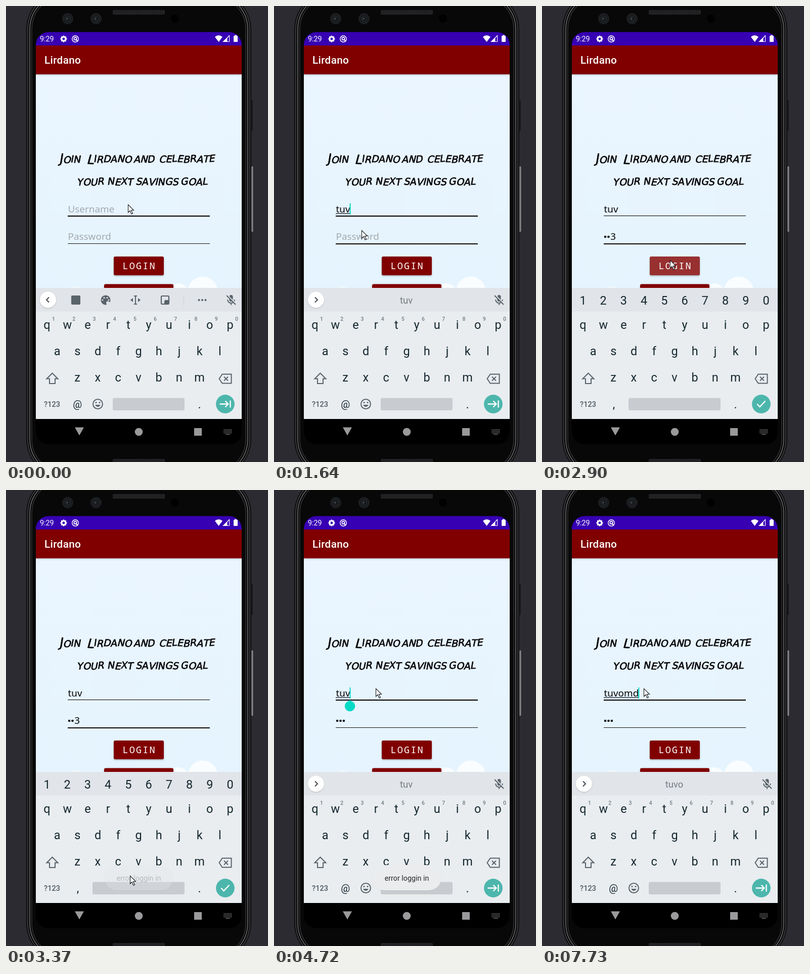
Animation, 518 px wide and 901 px high, one loop 8000 ms. Source, as an HTML page with a canvas:

```html
<!DOCTYPE html>
<html lang="en">
<head>
<meta charset="utf-8">
<title>Login screen</title>
<style>
html, body { margin: 0; width: 100%; height: 100%; overflow: hidden; background: #2c2b31; }
canvas { display: block; width: 518px; height: 901px; }
</style>
</head>
<body>
<canvas id="stage" width="518" height="901"></canvas>
<script>
const ctx = document.getElementById('stage').getContext('2d');
const LOOP = 8000;
const ROBOTO = 'Roboto, sans-serif';
const FIELD = '18.9px "Noto Sans", sans-serif';
const MAROON = '#800000', INK = '#14272e', ICON = '#59636a', TEAL = '#4db6ac', ACCENT = '#03dac5';
const PITCH = 40.22;

// Username over time: [start, text]
const typed = [
  [0, ''], [340, 't'], [520, 'tu'], [700, 'tuv'], [5510, 'tuvo'], [5910, 'tuv'], [6100, 'tuvo'],
  [6470, 'tuvo '], [6710, 'tuvo. '], [6960, 'tuvo.'], [7110, 'tuvo'], [7300, 'tuvom'], [7730, 'tuvomd']
];
const secret = [[0, ''], [1900, '1'], [2130, '•2'], [2380, '••3'], [3880, '•••']];
// Pointer keys: [time, x, y]
const pointer = [
  [1040, 241, 392], [1140, 226, 377], [1240, 201, 384], [1400, 173, 443],
  [2410, 173, 443], [2720, 253, 502], [3000, 253, 502], [3200, 249, 752],
  [3300, 245, 762], [3990, 245, 762], [4060, 218, 621], [4240, 207, 460], [4390, 201, 392]
];

const latest = (list, t) => list.filter(e => e[0] <= t).pop()[1];
const within = (t, a, b) => t >= a && t < b;
const ramp = (t, a, b) => Math.min(1, Math.max(0, (t - a) / (b - a)));

function pointerAt(t) {
  const next = pointer.findIndex(p => p[0] > t);
  if (next === 0) return pointer[0].slice(1);
  if (next < 0) return pointer[pointer.length - 1].slice(1);
  const a = pointer[next - 1], b = pointer[next], k = ramp(t, a[0], b[0]);
  return [a[1] + (b[1] - a[1]) * k, a[2] + (b[2] - a[2]) * k];
}

function rect(x, y, w, h, color) { ctx.fillStyle = color; ctx.fillRect(x, y, w, h); }
function round(x, y, w, h, r, fill, stroke, width = 1) {
  ctx.beginPath();
  ctx.roundRect(x, y, w, h, r);
  if (fill) { ctx.fillStyle = fill; ctx.fill(); }
  if (stroke) { ctx.strokeStyle = stroke; ctx.lineWidth = width; ctx.stroke(); }
}
function disc(x, y, r, color) {
  ctx.beginPath();
  ctx.arc(x, y, r, 0, 7);
  ctx.fillStyle = color;
  ctx.fill();
}
function ring(x, y, r, color, width) {
  ctx.beginPath();
  ctx.arc(x, y, r, 0, 7);
  ctx.strokeStyle = color; ctx.lineWidth = width;
  ctx.stroke();
}
function text(str, x, y, font, color, align = 'left', spacing = 0) {
  ctx.font = font; ctx.fillStyle = color; ctx.textAlign = align;
  ctx.letterSpacing = spacing + 'px';
  ctx.fillText(str, x, y);
  ctx.letterSpacing = '0px';
}
// SVG path drawn from a local origin
function path(d, x, y, fill, stroke, width = 2) {
  ctx.save();
  ctx.translate(x, y);
  const p = new Path2D(d);
  if (fill) { ctx.fillStyle = fill; ctx.fill(p); }
  if (stroke) { ctx.strokeStyle = stroke; ctx.lineWidth = width; ctx.stroke(p); }
  ctx.restore();
}
function shadow(color, blur, dy) { ctx.shadowColor = color; ctx.shadowBlur = blur; ctx.shadowOffsetY = dy; }
function noShadow() { shadow('transparent', 0, 0); }

function drawPhone() {
  rect(0, 0, 518, 901, '#2c2b31');
  round(484, 186, 4, 61, 1, '#19191c');
  round(484, 317, 4.5, 129, 1, '#858588');
  round(40.5, -30, 444, 962, 76, '#050506', '#161617', 1.5);
  round(43, -28, 439, 958, 74, null, '#4c4c4f', 1.5);
  round(47, -24, 431, 950, 70, '#0a0a0b', '#6a6a6d', 1.6);
  round(51, -20, 423, 942, 66, '#080808', '#333336', 1.5);
  for (const y of [8, 895]) {
    round(211, y, 103, 9, 2, '#242426');
    for (let x = 213; x < 312; x += 4) rect(x, y + 1, 1, 7, '#19191b');
  }
  for (const x of [122, 178]) {
    disc(x, 25, 11, '#1d1e21');
    disc(x, 25, 7, '#111315');
    ring(x, 25, 5, '#2b3033', 1.4);
    disc(x - 1, 25, 2, '#42474a');
  }
  disc(334, 25, 8, '#010102');
}

function drawStatusBar() {
  rect(59, 51, 407, 27, '#3700b3');
  text('9:29', 67, 70, '14.3px ' + ROBOTO, '#fff');
  for (let i = 0; i < 8; i++) {
    const a = i * Math.PI / 4;
    disc(114 + 5 * Math.cos(a), 65 + 5 * Math.sin(a), 1.7, '#fff');
  }
  ring(114, 65, 3.8, '#fff', 2.8);
  ring(137, 65, 6.2, '#fff', 1.5);
  ring(137, 64.5, 2.6, '#fff', 1.8);
  path('M1 2L5 6', 137, 64, null, '#fff', 1.8);
  path('M0 -4Q-7.5 -10 -15 -4L-7.5 6Z', 428, 65, '#fff');
  path('M0 0V-12L-12 0Z', 441.5, 70.5, null, '#fff', 1.2);
  path('M-4 0V-8L-12 0Z', 441.5, 70.5, '#fff');
  round(450, 59, 8, 12, 1, '#fff');
  rect(452, 57.5, 4, 2, '#fff');
}

// Handwritten capitals: inked outline, each letter leans and drifts a little
function scrawl(word, x, y, tallFirst) {
  ctx.fillStyle = ctx.strokeStyle = '#060608';
  ctx.lineWidth = 0.7;
  ctx.lineJoin = 'round';
  ctx.textAlign = 'left';
  [...word].forEach((ch, i) => {
    const tall = tallFirst && i === 0;
    ctx.font = `${tall ? 25 : 19}px "DejaVu Sans", sans-serif`;
    ctx.save();
    ctx.translate(x, y + Math.sin(i * 2.3 + x) * 0.9 + (tall ? 2 : 0));
    ctx.rotate(Math.sin(i * 4.1 + word.length) * 0.07);
    ctx.transform(1, 0, -0.22, 1, 0, 0);
    ctx.fillText(ch, 0, 0);
    ctx.strokeText(ch, 0, 0);
    ctx.restore();
    x += ctx.measureText(ch).width;
  });
  ctx.lineJoin = 'miter';
}

function drawPage(t, name, pass) {
  const sky = ctx.createLinearGradient(0, 135, 0, 557);
  sky.addColorStop(0, '#eaf5ff');
  sky.addColorStop(1, '#e5f4fe');
  rect(59, 135, 407, 423, sky);
  disc(389, 564, 29.5, '#f9fdff');
  disc(340, 571, 23, '#f9fdff');
  disc(137, 571, 17, '#f1f9fe');

  shadow('rgba(0,0,0,.25)', 3, 1);
  rect(59, 78, 407, 57, MAROON);
  noShadow();
  text('Lirdano', 76, 114, '500 20.8px ' + ROBOTO, '#fff', 'left', 0.3);

  scrawl('JOIN', 105, 309, true);
  scrawl('LIRDANO', 159, 309, true);
  scrawl('AND', 252, 309);
  scrawl('CELEBRATE', 302, 309);
  scrawl('YOUR', 140, 354);
  scrawl('NEXT', 200, 354);
  scrawl('SAVINGS', 256, 354);
  scrawl('GOAL', 345, 354);

  const nameFocus = !within(t, 1700, 4540), passFocus = within(t, 1600, 4640);
  rect(122, 414, 281, nameFocus ? 2.2 : 1.1, '#0b0b0d');
  rect(122, 469, 281, passFocus ? 2 : 1, '#0b0b0d');

  text(name || 'Username', 122.5, 408, FIELD, name ? '#050607' : '#a3a9ae');
  const width = name ? ctx.measureText(name).width : 0;
  const composing = name && !/[ .]/.test(name);
  if (nameFocus && composing) rect(122, 409.5, width, 1.3, '#101214');
  const nameCaret = within(t, 340, 1200) || within(t, 1580, 1700) || within(t, 4560, 5060) || t >= 5510;
  if (nameCaret) rect(121.5 + width, 390, 2, 22, ACCENT);

  if (!pass) text('Password', 122.5, 462, FIELD, '#a3a9ae');
  let x = 122.5;
  for (const ch of pass) {
    if (ch === '•') { disc(x + 2.6, 456, 2.3, '#050607'); x += 6.4; }
    else { text(ch, x, 462, FIELD, '#050607'); x += ctx.measureText(ch).width; }
  }
  if (within(t, 1700, 2880) || within(t, 3380, 3880)) rect(x, 444, 2, 22, ACCENT);

  shadow('rgba(0,0,0,.3)', 3, 1.5);
  round(213, 495, 99, 37, 3, MAROON);
  round(194, 549.5, 137, 37, 3, MAROON);
  noShadow();
  const press = ramp(t, 2760, 2860) * (1 - ramp(t, 3020, 3190));
  if (press) round(213, 495, 99, 37, 3, `rgba(255,255,255,${0.19 * press})`);
  text('LOGIN', 230.5, 520, '500 18.6px "Noto Sans Mono", monospace', '#fff', 'left', 2.1);

  if (within(t, 4640, 5510)) {
    const cx = 122 + width;
    disc(cx, 427, 10.3, ACCENT);
    path('M0 0L8 7V11H-8V7Z', cx, 415, ACCENT);
  }
}

function drawMicOff() {
  round(441.5, 571, 7, 13, 3.5, ICON);
  path('M-7 0Q-6 7 0 7Q6 7 7 0M0 7V11', 445, 580, null, ICON, 1.8);
  path('M-9 -9L9 9', 446, 580, null, '#e1e4e8', 2.5);
  path('M-9 -9L9 9', 445, 581, null, ICON, 2);
}

function drawToolbar() {
  round(129, 572, 18, 18, 2, ICON);

  disc(197, 581, 9.5, ICON);
  for (const [x, y] of [[191, 581], [194, 576.5], [200, 576.5], [203, 581]]) disc(x, y, 1.5, '#e1e4e8');
  path('M0 0Q4 -4 8 1L5 6H1Z', 198, 585, '#e1e4e8');

  path('M-3 -8H3M0 -8V8M-3 8H3', 256, 581, null, ICON, 2);
  path('M-5 -4L-10 0L-5 4ZM5 -4L10 0L5 4Z', 256, 581, ICON);

  round(307, 573, 15, 16, 2, null, ICON, 2.2);
  path('M-1 9V3Q-1 0 2 0H9V4L4 9Z', 314, 581, ICON);

  rect(351, 570, 1, 22, '#cfd3d7');
  for (const x of [381.5, 388, 394.5]) disc(x, 581, 2.1, ICON);
}

function drawStrip(word) {
  shadow('rgba(0,0,0,.2)', 2, 1);
  disc(83, 580.5, 16, '#fff');
  noShadow();
  path(word ? 'M-2 -5L3 0L-2 5' : 'M2 -5L-3 0L2 5', 83, 580.5, null, '#41484d', 2);
  if (word) text(word, 261.5, 588, '18.5px ' + ROBOTO, '#757c82', 'center');
  else drawToolbar();
  drawMicOff();
}

function drawKeyboard(numeric, word) {
  rect(59, 557, 407, 259, '#e9edf0');
  rect(59, 557, 407, 46.5, '#e1e4e8');
  const font = '23.5px ' + ROBOTO;
  const keys = (row, x, y) => [...row].forEach((k, i) => text(k, x + i * PITCH, y, font, INK, 'center'));

  if (numeric) keys('1234567890', 81, 590);
  else {
    drawStrip(word);
    [...'1234567890'].forEach((k, i) => text(k, 94 + i * PITCH, 621.5, '500 10.5px ' + ROBOTO, '#747c82', 'center'));
  }
  keys('qwertyuiop', 81, 638);
  keys('asdfghjkl', 101.2, 690);
  keys('zxcvbnm', 141.2, 742);

  path('M0 -11L11 0H5.5V9.5H-5.5V0H-11Z', 91.5, 736.5, null, ICON, 2);
  path('M-12 0L-6 -9H12V9H-6Z', 433.5, 736.5, null, ICON, 2);
  path('M-2 -4L6 4M6 -4L-2 4', 433, 736.5, null, ICON, 2);

  text('?123', 91, 792, '500 14.5px ' + ROBOTO, '#4c575e', 'center');
  text('.', 382.5, 795, font, INK, 'center');
  if (numeric) {
    text(',', 142, 795, font, INK, 'center');
    round(171, 774.5, 182, 24.5, 3, '#c8ccd0');
  } else {
    text('@', 141.3, 794, '20px ' + ROBOTO, INK, 'center');
    ring(181.5, 786.5, 9.5, ICON, 2);
    disc(178, 783.5, 1.5, ICON);
    disc(185, 783.5, 1.5, ICON);
    path('M-5.5 0Q0 8 5.5 0Z', 181.5, 788, ICON);
    round(211, 774.5, 142, 24.5, 3, '#c8ccd0');
  }
  disc(433.5, 786.5, 18.4, TEAL);
  path(numeric ? 'M-8 0L-3 5.5L8 -6' : 'M-11 0H6M0 -6L6 0L0 6M10 -7V7', 433.5, 786.5, null, '#fff', 2.3);
}

function drawNavBar() {
  const gray = '#9a9a9c';
  rect(59, 816, 407, 50, '#000');
  path('M-9 -8H9L0 8Z', 145, 840.5, gray);
  disc(262.5, 841.5, 7.8, gray);
  rect(372, 834, 15, 15, gray);
  for (let row = 0; row < 3; row++)
    for (let col = 0; col < 6; col++) rect(430.5 + col * 2.8, 836.5 + row * 3, 1.7, 1.7, '#77777a');
  rect(434, 845.5, 9, 1.3, '#77777a');
}

function drawToast(t) {
  const alpha = ramp(t, 3320, 3520) * (1 - ramp(t, 5120, 5400));
  if (!alpha) return;
  ctx.globalAlpha = alpha;
  shadow('rgba(0,0,0,.04)', 2, 1);
  round(194, 741, 137, 50, 25, '#ebecee');
  noShadow();
  text('error loggin in', 262.5, 772, '14.3px ' + ROBOTO, '#25282a', 'center');
  ctx.globalAlpha = 1;
}

function drawPointer(t) {
  const [x, y] = pointerAt(t);
  path('M0.5 0.5V16L4 12.5L7 19L9.5 18L6.5 11.5H11.5Z', x, y, '#fff', '#16181c', 1.1);
}

function draw(t) {
  const name = latest(typed, t), pass = latest(secret, t);
  const word = /[ .]/.test(name) ? '' : name.slice(0, 4);
  drawPhone();
  ctx.save();
  ctx.beginPath();
  ctx.roundRect(59, 51.5, 407, 814.5, 25);
  ctx.clip();
  drawPage(t, name, pass);
  drawStatusBar();
  drawKeyboard(within(t, 1720, 4660), word);
  drawNavBar();
  drawToast(t);
  ctx.restore();
  drawPointer(t);
}

function tick() {
  draw(performance.now() % LOOP);
  requestAnimationFrame(tick);
}
tick();
</script>
</body>
</html>
```
